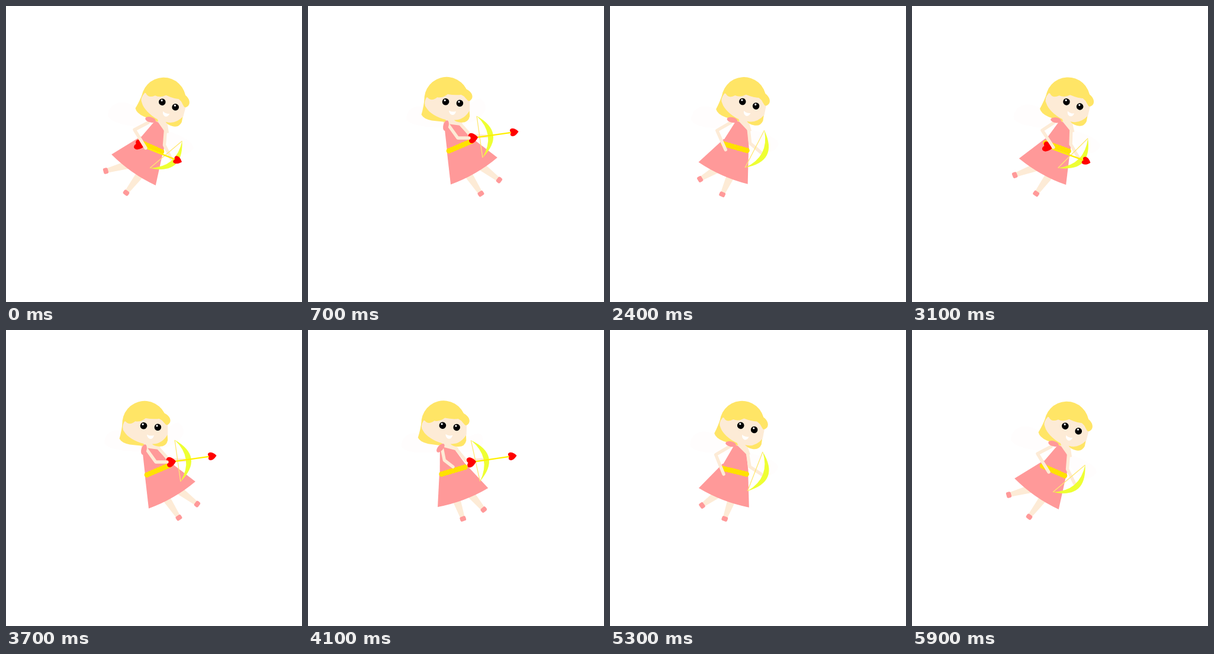
These frames come from a looping animation (500x500 px, 6010 ms). An HTML page:

```html
<!DOCTYPE html>
<html lang="en">
<head>
<meta charset="utf-8">
<title>Little archer</title>
<style>
html, body { margin: 0; width: 100%; height: 100%; overflow: hidden; background: #fff; }
svg { display: block; width: 100%; height: 100%; }
.skin { fill: #fdebd6; }
.pink { fill: #ff9999; }
.hair { fill: #ffe566; }
.arm { fill: none; stroke: #fdebd6; stroke-width: 5.4; stroke-linejoin: round; stroke-linecap: round; }
.wing { fill: #fffdfd; }
</style>
</head>
<body>
<svg viewBox="0 0 500 500">
  <defs>
    <path id="heart" fill="#f00" d="M8 0C4 5 0 7-3 6.5C-7 6-7 2-4.5 0C-7-2-7-6-3-6.5C0-7 4-5 8 0Z"/>
    <g id="eye"><circle r="5.8"/><circle cx="-1.6" cy="-2.2" r="1.6" fill="#fff"/></g>
  </defs>
  <path id="wingL" class="wing"/>
  <path id="wingR" class="wing"/>
  <path id="legL" class="skin"/>
  <path id="legR" class="skin"/>
  <rect id="shoeL" class="pink" x="-4" y="-5" width="8" height="10" rx="2.5"/>
  <rect id="shoeR" class="pink" x="-4" y="-5" width="8" height="10" rx="2.5"/>
  <path id="skirt" class="pink" d="M-23-4L23-4L45 49Q0 57-46 49Z"/>
  <g id="bodice">
    <path class="skin" d="M-12-50L7-50L18-34L12-30L-12-42Z"/>
    <path class="pink" d="M-12-42L-6-42L12-32L24-2L-23 0Z"/>
    <path d="M-20 1.5L20.8 0" fill="none" stroke="#ffe100" stroke-width="9.2" stroke-linecap="round" stroke-dasharray="0 5.1"/>
  </g>
  <path id="armR" class="arm"/>
  <g id="bow">
    <path id="string" d="M0-35.5V35.5" stroke="#ffe873" stroke-width="1.3"/>
    <path fill="#eeff33" d="M0-35.5Q46 0 0 35.5Q28 0 0-35.5Z"/>
  </g>
  <g id="arrow">
    <path d="M-35 0H35" stroke="#fff000" stroke-width="2.4"/>
    <use href="#heart" transform="translate(-35 0) scale(1.1 1.3)"/>
    <use href="#heart" transform="translate(35 0)"/>
  </g>
  <path id="armL" class="arm"/>
  <g id="head">
    <circle class="hair" cx="-11" cy="-4.4" r="37.6"/>
    <path class="hair" d="M-48-5Q-48 12-50.5 26Q-46 33-32 34L-8 34L4 20L-20-10Z"/>
    <path class="hair" d="M5 29Q22 26 29 8L31 20Q30 31 18 32Q10 33 5 29Z"/>
    <path class="skin" d="M-45-4Q-50 8-43 14C-38 21-24 28-9 30Q-4 38 6 29Q22 28 30 10L28-8L0-20L-30-10Z"/>
    <path class="hair" d="M-48-4A37.6 37.6 0 0 1 20-25C30-22 34-14 31-9Q28-4 25-6Q20-10 15-15.5Q5-12-10-13Q-18-5-27-6Q-36 3-43-4Z"/>
    <use href="#eye" x="-12"/>
    <use href="#eye" x="12"/>
    <path fill="#fff" d="M-5 14Q1 17 7 14Q6 21 1 21Q-4 20-5 14Z"/>
  </g>
  <ellipse id="sleeve" class="pink" rx="9" ry="4.5"/>
</svg>
<script>
const el = {};
for (const e of document.querySelectorAll('svg [id]')) el[e.id] = e;

// Points as x, y; placed parts as x, y, angle.
const fly = {
  waist: [244, 237], tilt: [35, 26], head: [275, 166.5, 21], sleeve: [244, 192, 15],
  footL: [168.5, 278.5], footR: [203, 315.5], wingL: [172, 182], wingR: [316, 241],
  armL: [240, 197, 217, 209, 236, 240], armR: [270, 204, 267.5, 235, 281, 262], bow: [270.3, 250.9, 50]
};
const stand = {
  waist: [220, 239], tilt: [0, 0], head: [228, 162.5, 12], sleeve: [204, 193.5, 8],
  footL: [196, 323], footR: [240, 324], wingL: [140, 208], wingR: [294, 222],
  armL: [206, 196, 181, 213, 186, 249], armR: [234, 203, 249, 225, 279, 217], bow: [267.5, 221, -22]
};
const aim = {
  waist: [256.4, 236], tilt: [-30, -21], head: [244.5, 163, 6], sleeve: [233, 202, -75],
  footL: [292, 317], footR: [323, 294], wingL: [166, 188], wingR: [294, 158],
  armL: [235, 198, 253, 223, 272, 223], armR: [258, 200, 275, 219, 302, 220], bow: [290, 221, -8]
};

// time, swing (-1 fly, 0 stand, 1 aim), sideways drift
const swing = [
  [0, -1, 0], [100, -0.84, 4.8], [300, -0.2, 24], [400, 0.24, 22.8], [500, 0.62, 11.4], [600, 0.9, 3],
  [700, 1, 0], [1000, 0.92, 0], [1200, 0.45, 0], [1400, 0.04, 0], [1600, 0, 0], [2100, -0.43, -22],
  [2500, -0.77, -26], [2600, -0.86, -22], [2700, -1, -17], [2900, -1, -5], [3000, -1, 0]
];
// time, x, y, angle
const flight = [
  [0, 257, 247.7, 21.5], [100, 261, 250, 20], [300, 288, 237, 6], [500, 314, 222, -6], [600, 316, 219, -8],
  [700, 313, 218, -8], [1000, 309, 218.5, -8], [1200, 311, 218, -9], [1300, 327, 216, -9], [1400, 342, 214, -9]
];

const mix = (a, b, u) => a.map((v, i) => v + (b[i] - v) * u);

function sample(keys, t) {
  let i = 1;
  while (i < keys.length - 1 && keys[i][0] < t) i++;
  const a = keys[i - 1], b = keys[i];
  return mix(a, b, Math.min(1, (t - a[0]) / (b[0] - a[0]))).slice(1);
}

function turn(x, y, deg, [ox, oy]) {
  const r = deg * Math.PI / 180, c = Math.cos(r), s = Math.sin(r);
  return [ox + x * c - y * s, oy + x * s + y * c];
}

const place = (e, [x, y, a]) => e.setAttribute('transform', `translate(${x} ${y}) rotate(${a})`);
const poly = p => 'M' + p.join(' ');

function leg(name, hip, foot) {
  const dx = foot[0] - hip[0], dy = foot[1] - hip[1], n = Math.hypot(dx, dy);
  const px = -dy / n, py = dx / n;
  el['leg' + name].setAttribute('d', poly([
    hip[0] + px * 7, hip[1] + py * 7, foot[0] + px * 3.5, foot[1] + py * 3.5,
    foot[0] - px * 3.5, foot[1] - py * 3.5, hip[0] - px * 7, hip[1] - py * 7]) + 'Z');
  place(el['shoe' + name], [...foot, Math.atan2(dy, dx) * 180 / Math.PI]);
}

function wing(name, base, tip) {
  const dx = tip[0] - base[0], dy = tip[1] - base[1];
  const k = 0.75, w = 0.5;
  el['wing' + name].setAttribute('d', `M${base}C${[base[0] + dx * k - dy * w, base[1] + dy * k + dx * w]} ${
    [tip[0] - dy * 0.25, tip[1] + dx * 0.25]} ${tip}C${[tip[0] + dy * 0.1, tip[1] - dx * 0.1]} ${
    [base[0] + dx * k + dy * 0.2, base[1] + dy * k - dx * 0.2]} ${base}Z`);
}

function draw(t) {
  const [s, drift] = sample(swing, t);
  const raising = t <= 700;
  const part = key => mix(stand[key], (s < 0 ? fly : aim)[key], Math.abs(s));
  const body = (key, shift = drift) => { const p = part(key); p[0] += shift; return p; };
  // The arms go straight from one hold to the other while the bow is raised.
  const held = key => {
    if (raising) return mix(fly[key], aim[key], (s + 1) / 2);
    const p = part(key);
    const step = key === 'bow' ? 3 : 2;
    return p.map((v, i) => i % step === 0 ? v + drift : v);
  };

  const waist = body('waist'), [skirt, bodice] = part('tilt');
  place(el.skirt, [...waist, skirt]);
  place(el.bodice, [...waist, bodice]);
  place(el.head, body('head'));
  place(el.sleeve, raising ? held('sleeve') : body('sleeve'));
  // The feet trail behind the hips as the body swings forward.
  const trail = raising ? drift * (1 - Math.abs(s)) : drift;
  leg('L', turn(-12, 46, skirt, waist), body('footL', trail));
  leg('R', turn(13, 46, skirt, waist), body('footR', trail));

  const back = turn(0, -34, bodice, waist);
  wing('L', back, body('wingL'));
  wing('R', back, body('wingR'));

  el.armL.setAttribute('d', poly(held('armL')));
  el.armR.setAttribute('d', poly(held('armR')));
  place(el.bow, held('bow'));
  el.string.style.display = t >= 1300 && t < 2100 ? 'none' : '';
  el.arrow.style.display = t < 1500 ? '' : 'none';
  place(el.arrow, sample(flight, Math.min(t, 1400)));
}

const LOOP = 6010, STEP = 100, CYCLE = 30;
const start = performance.now();
function tick(now) {
  const t = Math.max(0, now - start) % LOOP;
  const n = Math.min(59, Math.floor(t / STEP));
  draw(n % CYCLE * STEP);
  requestAnimationFrame(tick);
}
draw(0);
requestAnimationFrame(tick);
</script>
</body>
</html>
```
